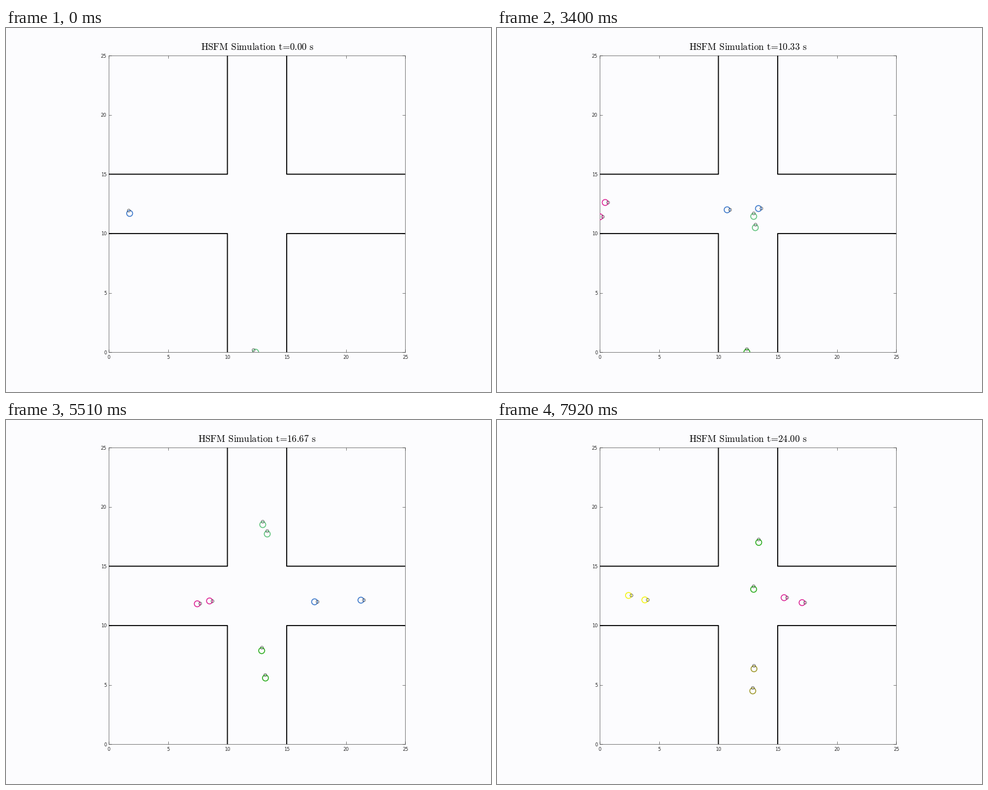
A matplotlib script that plays this animation: 864x648 px, repeating every 8000 ms.

```python
import matplotlib.pyplot as plt
import numpy as np
from matplotlib.animation import FuncAnimation
from matplotlib.patches import Circle

WIDTH, HEIGHT, DPI = 864, 648, 72
LOOP_MS, INTERVAL_MS = 8000, 20
STEPS_PER_SECOND = 3
BODY_RADIUS, HEAD_RADIUS = 0.25, 0.125
BACKGROUND, INK = "#fcfcfe", "#262626"
BLUE, MINT, PINK = "#3f7acb", "#62c47f", "#dd2a98"
GREEN, YELLOW, OLIVE = "#2fae22", "#f4f418", "#a09a30"

plt.rcParams.update({
    "font.family": "DejaVu Sans",
    "mathtext.fontset": "cm",
    "xtick.labelsize": 8.3,
    "ytick.labelsize": 8.3,
})

# Playback is slightly uneven: steps last 100, 130 and 100 ms in turn.
STEP_STARTS = np.array([110 * k + (0, -10, 10)[k % 3] for k in range(73)])


def clock(t):
    """Walking time: everyone speeds up from rest during the first seconds."""
    return t - 1 + np.exp(-t)


def smoothstep(u):
    u = np.clip(u, 0, 1)
    return u * u * (3 - 2 * u)


class Walker:
    """Walks down one corridor, drifts between lanes and may give way once.

    enter: walking time at which the edge of the plot is crossed
    lanes: sideways position at the edge and after `settle` units of walking
    wait:  distance lost by slowing down around time `at`, spread by `over`
    """

    def __init__(self, ax, color, enter, speed, lanes, settle=12,
                 wait=0, at=0, over=1, north=False, turn=0):
        self.enter, self.speed = enter, speed
        self.lanes, self.settle = lanes, settle
        self.wait, self.at, self.over = wait, at, over
        self.north, self.turn = north, np.radians(turn)
        self.body = ax.add_patch(Circle((0, 0), BODY_RADIUS, fill=False,
                                        ec=color, lw=1.6, zorder=3))
        self.head = ax.add_patch(Circle((0, 0), HEAD_RADIUS, fill=False,
                                        ec=INK, lw=0.65, zorder=4))

    def locate(self, t):
        along = self.speed * (clock(t) - self.enter)
        along -= self.wait * (1 + np.tanh((t - self.at) / self.over)) / 2
        start, end = self.lanes
        across = start + (end - start) * smoothstep(along / self.settle)
        return np.array((across, along) if self.north else (along, across))

    def update(self, t):
        position = self.locate(t)
        dx, dy = self.locate(t + 0.05) - position
        heading = np.arctan2(dy, dx) + self.turn * np.exp(-t / 0.6)
        self.body.center = position
        self.head.center = position + BODY_RADIUS * np.array(
            [np.cos(heading), np.sin(heading)])


def title_text(t):
    gap, tight = r"\hspace{0.38}", r"\hspace{-0.2}"
    return (rf"$\mathrm{{HSFM{gap}Simulation{gap}"
            rf"t{tight}={tight}{t:.2f}{gap}s}}$")


fig = plt.figure(figsize=(WIDTH / DPI, HEIGHT / DPI), dpi=DPI,
                 facecolor=BACKGROUND)
ax = fig.add_axes([183.2 / WIDTH, 70.9 / HEIGHT, 528.1 / WIDTH, 528 / HEIGHT],
                  facecolor=BACKGROUND)
ax.set(xlim=(0, 25), ylim=(0, 25),
       xticks=range(0, 26, 5), yticks=range(0, 26, 5))
ax.tick_params(direction="in", length=5, width=0.6, color=INK, labelcolor=INK,
               top=True, right=True, pad=4)
ax.tick_params(axis="x", pad=5)
ax.spines[:].set(linewidth=0.6, color=INK)

for x, x_end in ((10, 0), (15, 25)):
    for y, y_end in ((10, 0), (15, 25)):
        ax.plot([x_end, x, x], [y, y, y_end], color="black", lw=1.8, snap=False)

title = fig.text(447.4 / WIDTH, 609 / HEIGHT, title_text(0), size=16.8,
                 color="black", ha="center", va="baseline")

walkers = [
    Walker(ax, BLUE, -1.41, 1.245, (11.68, 12.14), settle=16, turn=106),
    Walker(ax, BLUE, 0.82, 1.263, (12, 12), wait=1.4, at=12.5),
    Walker(ax, MINT, 0, 1.25, (12.38, 12.98), wait=1.3, at=13.5, over=4,
           north=True, turn=45),
    Walker(ax, MINT, 0.51, 1.19, (12.45, 13.36), settle=16, wait=0.32, at=12.5,
           north=True),
    Walker(ax, PINK, 8.98, 1.27, (12.62, 11.93), wait=0.75, at=20),
    Walker(ax, PINK, 9.33, 1.177, (11.41, 12.35), settle=16, wait=0.55, at=20.5),
    Walker(ax, GREEN, 9.33, 1.244, (12.4, 13.4), settle=16, north=True),
    Walker(ax, GREEN, 11.02, 1.2, (13.4, 12.97), wait=1.5, at=23, north=True),
    Walker(ax, YELLOW, 19.94, 1.24, (12.18, 12.1)),
    Walker(ax, YELLOW, 21.05, 1.24, (12.54, 12.5)),
    Walker(ax, OLIVE, 17.93, 1.253, (13, 13), north=True),
    Walker(ax, OLIVE, 19.5, 1.283, (12.85, 13), north=True),
]


def draw(frame):
    elapsed = (frame + 0.5) * INTERVAL_MS
    step = np.searchsorted(STEP_STARTS, elapsed, "right") - 1
    t = step / STEPS_PER_SECOND
    title.set_text(title_text(t))
    for walker in walkers:
        walker.update(t)
    return []


animation = FuncAnimation(fig, draw, frames=LOOP_MS // INTERVAL_MS,
                          interval=INTERVAL_MS, repeat=True, repeat_delay=0,
                          cache_frame_data=False)
plt.show()
```
